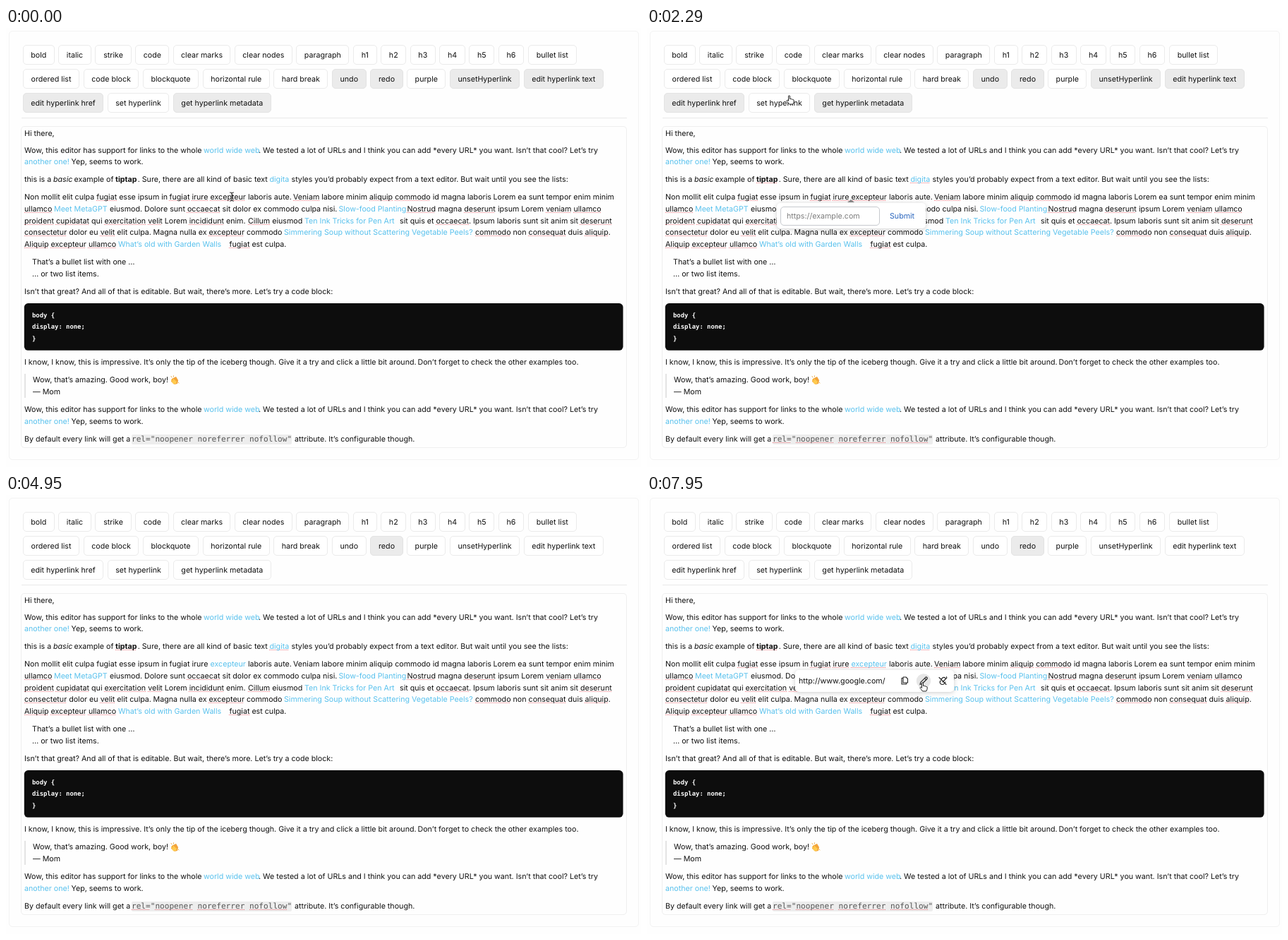
An HTML page that plays this animation: 900 by 622 pixels, repeating every 8000 ms.

```html
<!DOCTYPE html>
<html lang="en">
<head>
<meta charset="utf-8">
<title>Hyperlink editor</title>
<style>
html, body { margin: 0; width: 100%; height: 100%; overflow: hidden; background: #fefefe; }
#stage {
  position: relative; width: 900px; height: 622px; overflow: hidden;
  font: 10.68px/16px Inter, "Open Sans", sans-serif; color: #101010;
  text-rendering: geometricPrecision;
}
#stage * { box-sizing: border-box; }
.box, .run, .button, .popup, svg { position: absolute; }
.run { white-space: pre; }
.box { border: 1px solid #efefef; border-radius: 5px; }
.button {
  height: 28.5px; border: 1px solid #ebebeb; border-radius: 5px;
  background: #fff; text-align: center; line-height: 27px; white-space: pre;
}
.button.off { background: #ebebeb; border-color: #e3e3e3; }
.link, .linked .word { color: #58c1ed; }
.selected .word { background: #b5d7fd; }
.mono { font-family: "DejaVu Sans Mono", "Noto Sans Mono", monospace; }
.pre { font-size: 8.9px; font-weight: 700; color: #fff; }
.rel { font-size: 11.1px; color: #555; background: #ededed; border-radius: 2px; line-height: 14px; margin-top: 1px; }
.spell {
  text-decoration: underline dotted 1.3px rgba(235, 70, 80, .75);
  text-underline-offset: 1.4px; text-decoration-skip-ink: none;
}
#stage:not(.checked) .late, .retouched .first { text-decoration: none; }
.popup { background: #fff; border-radius: 5px; box-shadow: 0 1px 6px rgba(0, 0, 0, .2); }
#form { left: 184px; top: 247.5px; width: 210.5px; height: 36.5px; }
#form::before {
  content: ""; position: absolute; left: 100px; top: -4.5px;
  border: 5px solid transparent; border-top: 0; border-bottom: 4.5px solid #858585;
}
#field {
  position: absolute; left: 5px; top: 5px; width: 141px; height: 27px;
  border: 1px solid #c6c9ce; border-radius: 5px; padding-left: 8px; line-height: 26px; white-space: pre;
}
#field.empty { color: #7b7b7b; }
#caret { display: inline-block; width: 1px; height: 13px; margin-right: -1px; vertical-align: -3px; background: #111; }
#submit { position: absolute; left: 160px; top: 11px; color: #2864bd; }
#preview { left: 209.5px; top: 248px; width: 225.5px; height: 30.5px; }
#preview span { position: absolute; left: 5.5px; top: 8px; }
</style>
</head>
<body>
<div id="stage"></div>
<script>
const LOOP = 8000;
const stage = document.getElementById('stage');

const buttonRows = [
  [38, [24, 'bold', 74.5, 'italic', 126.5, 'strike', 183.5, 'code', 237, 'clear marks', 324, 'clear nodes',
    411.5, 'paragraph', 492, 'h1', 531.5, 'h2', 573, 'h3', 614.5, 'h4', 656.5, 'h5', 698, 'h6', 740, 'bullet list', 814.5]],
  [72, [24, 'ordered list', 110, 'code block', 194, 'blockquote', 279, 'horizontal rule', 379.5, 'hard break',
    462, 'undo', 516.5, 'redo', 568.5, 'purple', 629, 'unsetHyperlink', 734, 'edit hyperlink text', 852.5]],
  [106, [24, 'edit hyperlink href', 144, 'set hyperlink', 237, 'get hyperlink metadata', 381.5]],
];
const disabled = ['undo', 'redo', 'unsetHyperlink', 'edit hyperlink text', 'edit hyperlink href', 'get hyperlink metadata'];

// Each line: vertical centre, then runs of [left, text, class]; ~word~ is marked by the spell checker.
const intro = y => [
  [y, [26, 'Wow, this editor has support for links to the whole'], [280, 'world wide web', 'link'],
    [358, '. We tested a lot of URLs and I think you can add *every URL* you want. Isn’t that cool? Let’s try']],
  [y + 16.7, [26, 'another one!', 'link'], [92.5, 'Yep, seems to work.']],
];
const lines = [
  [150.2, [26, 'Hi there,']],
  ...intro(173.5),
  [215.2, [26, 'this is a'], [67, '<i>basic</i>'], [96.5, 'example of'], [155, '<b>~tiptap~</b>', 'late'],
    [186.7, '. Sure, there are all kind of basic text'], [373.5, '~digita~', 'link late'],
    [404.5, 'styles you’d probably expect from a text editor. But wait until you see the lists:']],
  [240.2, [26, 'Non mollit elit culpa ~fugiat~ esse ipsum in', 'first'], [231.5, '~fugiat~ ~irure~', 'first'],
    [289.5, '~excepteur~', 'word first'], [343, 'laboris aute.'],
    [407, '~Veniam~ labore minim ~aliquip~ ~commodo~ id magna laboris', 'first'], [690.5, 'Lorem ea sunt tempor enim minim']],
  [257.1, [26, '~ullamco~'], [68, 'Meet MetaGPT', 'link'], [147, 'eiusmod.'],
    [196, 'Dolore sunt ~occaecat~ sit dolor ex commodo culpa nisi.'], [471.5, 'Slow-food Planting', 'link'],
    [568.5, '~Nostrud~ magna ~deserunt~ ipsum Lorem ~veniam~ ~ullamco~']],
  [273.7, [26, '~proident~ ~cupidatat~ qui ~exercitation~ ~velit~ Lorem ~incididunt~ enim.'], [343, '~Cillum~ eiusmod'],
    [423, 'Ten Ink Tricks for Pen Art', 'link'], [558, 'sit quis et ~occaecat~.'],
    [662, 'Ipsum laboris sunt sit anim sit ~deserunt~']],
  [290.4, [26, '~consectetur~ dolor eu ~velit~ elit culpa.'], [208.5, 'Magna nulla ex ~excepteur~ commodo'],
    [394, 'Simmering Soup without Scattering Vegetable Peels?', 'link'], [665, '~commodo~ non ~consequat~ duis ~aliquip~.']],
  [307.2, [26, '~Aliquip~ ~excepteur~ ~ullamco~'], [159, 'What’s old with Garden Walls', 'link'], [316.5, '~fugiat~ est culpa.']],
  [332.2, [37, 'That’s a bullet list with one …']],
  [348.9, [37, '… or two list items.']],
  [373.9, [26, 'Isn’t that great? And all of that is editable. But wait, there’s more. Let’s try a code block:']],
  [407.5, [37, 'body {', 'mono pre']],
  [424.3, [37, 'display: none;', 'mono pre']],
  [440.9, [37, '}', 'mono pre']],
  [474.2, [26, 'I know, I know, this is impressive. It’s only the tip of the iceberg though. Give it a try and click a little bit around.'],
    [583.5, 'Don’t forget to check the other examples too.']],
  [499.2, [38, 'Wow, that’s amazing. Good work, boy!']],
  [515.6, [38, '— Mom']],
  ...intro(540.9),
  [582.6, [26, 'By default every link will get a'],
    [178, '~rel=~"~noopener~ ~noreferrer~ ~nofollow~"', 'mono rel late'], [409, 'attribute. It’s configurable though.']],
];

const rect = (x, y, w, h, style = '') =>
  `<div class="box" style="left:${x}px;top:${y}px;width:${w}px;height:${h}px;${style}"></div>`;
const svg = (id, x, y, w, h, body) =>
  `<svg id="${id}" style="left:${x}px;top:${y}px" width="${w}" height="${h}" viewBox="0 0 ${w} ${h}"
    fill="none" stroke="#222" stroke-width="1.1" stroke-linecap="round" stroke-linejoin="round">${body}</svg>`;

const drawButtons = ([y, row]) => {
  let html = '';
  for (let i = 0; i < row.length - 1; i += 2) {
    const width = row[i + 2] - row[i] - 5.3;
    html += `<div class="button" data-label="${row[i + 1]}"
      style="left:${row[i] - .3}px;top:${y - 14.3}px;width:${width}px">${row[i + 1]}</div>`;
  }
  return html;
};
const drawLine = ([y, ...runs]) => runs.map(([x, text, kind = '']) => {
  const late = kind.includes('late') ? ' late' : kind.includes('first') ? ' first' : '';
  const marked = text.replace(/~([^~]+)~/g, `<span class="spell${late}">$1</span>`);
  return `<div class="run ${kind}" style="left:${x}px;top:${y - 8}px">${marked}</div>`;
}).join('');

const codeBlock = svg('code', 25, 389, 851, 69,
  '<rect x=".8" y="1.1" width="848.8" height="66.7" rx="5.5" fill="#0d0d0d" stroke="none"/>');
const clap = svg('clap', 232, 491.5, 14, 14, `
  <g stroke="none"><path d="M3 5 9 2l3 5-1 5-4 1-5-4z" fill="#f2a33a"/>
  <path d="M1.5 5.5 5 8l-1-4 6 5-1 3-4 .5z" fill="#ffcb4f"/></g>
  <path d="M3 3 2 1.5M5.5 2 5.5.8M12 10l1 1" stroke="#e4a23b" stroke-width=".9"/>`);
const icons = svg('icons', 146, 4, 76, 23, `
  <circle id="hover" cx="36" cy="11.5" r="10.2" fill="#e6e6e6" stroke="none"/>
  <path d="M7 6h4l2.5 2.5V14H7zM7 7.5H5V16h6.5v-2"/>
  <path d="M31 16.5l.8-3.2 7-7q1-.8 2 .2t.2 2l-7 7zM37.6 7.6l2.2 2.2"/>
  <path d="M61 9l2-2q2-1.6 4 .6M67 13l-2 2.5q-2.5 2-5 0-1.8-2.5.2-4.5M63 13l3-3 2-2q1.5-1 .4-2.4M58 6.5l10 10"/>`);

stage.innerHTML =
  rect(4, 3.5, 892.5, 608.5, 'border-color:#f3f3f3') +
  rect(22, 127, 858, 1, 'border:0;border-radius:0;background:#e9e9e9') +
  rect(21, 138.5, 858.5, 456.5) +
  rect(26, 490, 1.5, 33.5, 'border:0;border-radius:0;background:#e4e4e4') +
  codeBlock + buttonRows.map(drawButtons).join('') + lines.map(drawLine).join('') + clap +
  `<div class="popup" id="form"><div id="field"></div><span id="submit">Submit</span></div>
   <div class="popup" id="preview"><span>http://www.google.com/</span>${icons}</div>` +
  svg('beam', 0, 0, 14, 16, '<path d="M4.5 2q2 0 2.5 1.2Q7.5 2 9.5 2M7 3v10M4.5 14q2 0 2.5-1.2Q7.5 14 9.5 14"/>') +
  svg('hand', 0, 0, 14, 16, `<path fill="#fff" stroke-width="1"
    d="M4.5 9V3q0-1.3 1-1.3t1 1.3v3.5q1.8-.8 2.2.5 1.6-.6 2 .6 1.6-.2 1.6 1.2 0 3-1.5 5.2H5.5Q4 11.5 2 9.5 1.8 8 3.2 8.2z"/>`) +
  svg('arrow', 0, 0, 14, 16, '<path fill="#111" stroke="#fff" stroke-width=".8" d="M3 2v11l2.7-2.5 1.7 4 1.6-.7-1.7-3.8H11z"/>');

const el = id => document.getElementById(id);
const show = (id, on) => { el(id).style.display = on ? '' : 'none'; };
const buttons = [...document.querySelectorAll('.button')];

const SELECT = 250, OPEN = 1400, TYPE = 2350, KEY = 172, ENTER = 4950, PREVIEW = 6250;
const ADDRESS = 'www.google.com';
// Pointer centre: [time, x, y]
const path = [
  [0, 320, 239], [450, 320, 239], [1150, 201, 104], [1540, 203, 102], [5250, 203, 102],
  [5800, 326, 234], [6000, 326, 234], [6200, 325, 238], [7050, 325, 238], [7700, 392, 272], [LOOP, 392, 272],
];

function pointerAt(t) {
  const i = path.findIndex(p => p[0] > t);
  const [t0, x0, y0] = path[i - 1], [t1, x1, y1] = path[i];
  const p = (t - t0) / (t1 - t0), k = p * p * (3 - 2 * p);
  return [x0 + (x1 - x0) * k, y0 + (y1 - y0) * k];
}

function render(t) {
  const linked = t >= ENTER, formOpen = t >= OPEN && !linked, previewOpen = t >= PREVIEW;
  stage.classList.toggle('selected', t >= SELECT && t < OPEN);
  stage.classList.toggle('checked', t >= SELECT);
  stage.classList.toggle('linked', linked);
  stage.classList.toggle('retouched', linked && t < 7300);
  for (const b of buttons) {
    const label = b.dataset.label;
    b.classList.toggle('off', linked ? label === 'redo' : disabled.includes(label));
  }

  show('form', formOpen);
  if (formOpen) {
    const count = Math.max(0, Math.min(ADDRESS.length, Math.floor((t - TYPE) / KEY) + 1));
    const typing = t >= TYPE && t < TYPE + KEY * ADDRESS.length;
    const caretOn = typing || (t - OPEN) % 1000 < 500;
    const caret = `<span id="caret" style="opacity:${+caretOn}"></span>`;
    el('field').className = count ? '' : 'empty';
    el('field').innerHTML = count ? ADDRESS.slice(0, count) + caret : caret + 'https://example.com';
  }

  const [x, y] = pointerAt(t);
  const visible = t < 2300 || t >= 5250;
  const onPopup = previewOpen && y > 248;
  const kind = y > 139 && !onPopup ? 'beam' : y < 121 || x > 355 ? 'hand' : 'arrow';
  for (const id of ['beam', 'hand', 'arrow']) show(id, visible && id === kind);
  el(kind).style.transform = `translate(${x - 7}px, ${y - 8}px)`;
  show('preview', previewOpen);
  show('hover', onPopup && x > 381);
}

function tick() {
  render(performance.now() % LOOP);
  requestAnimationFrame(tick);
}
tick();
</script>
</body>
</html>
```
